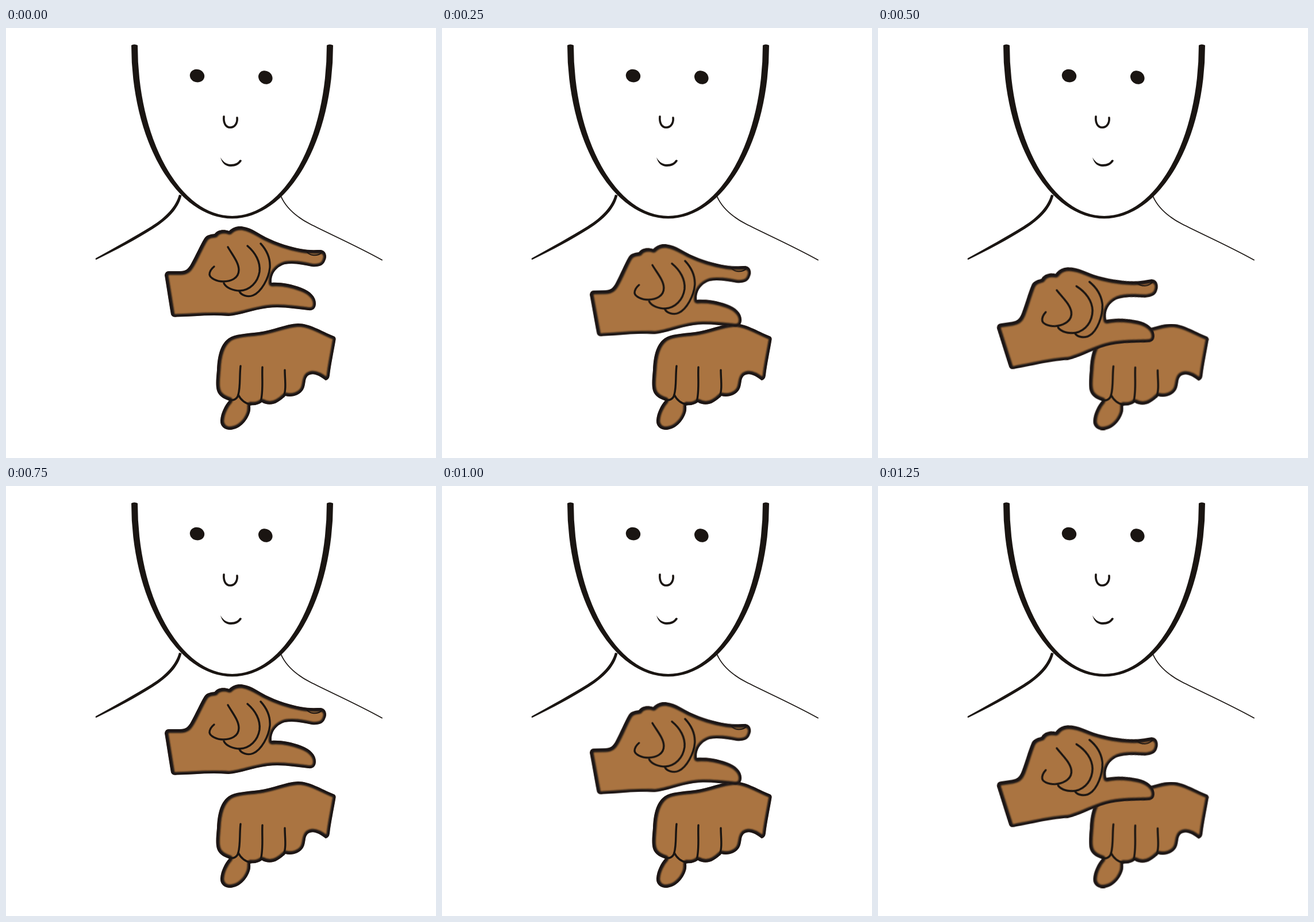
An HTML page for the animation above (1500 ms loop, 748 by 748 pixels).

```html
<!DOCTYPE html>
<html lang="en">
<head>
<meta charset="utf-8">
<title>Signing hands</title>
<style>
  html, body { margin: 0; width: 100%; height: 100%; overflow: hidden; background: #fff; }
  svg { display: block; width: 100%; height: 100%; }
  .ink { fill: #1a1512; }
  .line { fill: none; stroke: #1a1512; stroke-linecap: round; stroke-linejoin: round; }
  .skin { fill: #aa7441; }
  .edge { stroke-width: 11.5; filter: url(#soft); }
  .crease { stroke-width: 3.4; filter: url(#softer); }

  #upper, #lower { transform-origin: 0 0; animation: 750ms step-end infinite; }
  #upper { animation-name: tap; }
  #lower { animation-name: nudge; }

  /* Each pose pins the wrist corner (278, 427), then turns the hand around it. */
  @keyframes tap {
    0% { transform: none; }
    33.333% { transform: translate(259px, 460.8px) rotate(-1.25deg) translate(-278px, -427px); }
    66.667% { transform: translate(208.5px, 519px) rotate(-8.4deg) scale(1.024) translate(-278px, -427px); }
  }
  @keyframes nudge {
    0% { transform: none; }
    66.667% { transform: translate(1.5px, .5px); }
  }
</style>
</head>
<body>
<svg viewBox="0 0 748 748">
  <defs>
    <filter id="soft" filterUnits="userSpaceOnUse" x="200" y="300" width="420" height="440">
      <feGaussianBlur stdDeviation="1"/>
    </filter>
    <filter id="softer" filterUnits="userSpaceOnUse" x="200" y="300" width="420" height="440">
      <feGaussianBlur stdDeviation=".5"/>
    </filter>

    <path id="pinch" d="M276 430 Q277 423 283 423 L303 423 C313 423 317 419 322 410
      C330 396 337 379 345 366 C349 360 355 359 363 358 C367 352 377 349 388 353
      C395 346 404 344 412 345.5 C428 348 440 358 452 364 C472 374 496 381 512 384
      C526 387 538 386 548 386 C557 388 559 397 555 405 C552 413 545 416 532 415
      C517 412 501 408 485 411 C471 415 461 427 462 443 C476 442 496 445 514 452
      C530 458 539 468 539 479 C539 487 535 492 526 491 C506 489 480 484 455 487
      C430 490 406 500 387 501 C355 498 325 502 297 502.500 Q289 504 287 498
      C283 474 279 448 276 430Z"/>
    <path id="fist" d="M570 536 C548 527 528 514 508 514 C486 515 464 526 440 529
      C416 532 399 532 387 540 C372 551 368 572 367 595 C365 617 364 630 371 638
      C376 644 382 646 388 648 C381 656 374 669 373 682 C372 693 380 699 390 699
      C406 698 418 685 423 672 C426 665 425 661 425 656 C433 657 440 655 445 651
      C453 656 464 656 472 651 C479 647 483 643 486 640 C497 643 511 639 517 629
      C522 620 519 611 525 605 C534 598 546 605 556 613 Q562 612 563 604
      C565 586 570 563 573.500 542 Q574 537.500 570 536Z"/>
    <clipPath id="pinchClip"><use href="#pinch"/></clipPath>
    <clipPath id="fistClip"><use href="#fist"/></clipPath>
  </defs>

  <!-- Face and shoulders -->
  <path class="ink" d="M218 30 Q223 27 229 30 A164.500 297 0 0 0 558 30
    Q563 27 569 30 A175.500 301.500 0 0 1 218 30Z"/>
  <ellipse class="ink" cx="332.5" cy="83.2" rx="12.8" ry="11.2" transform="rotate(14 332.5 83.2)"/>
  <ellipse class="ink" cx="451.3" cy="86" rx="12.8" ry="11.2" transform="rotate(35 451.3 86)"/>
  <path class="line" stroke-width="3.6" d="M379 154 C378 165 382 173 390 173 C399 173 403 164 402 156"/>
  <path class="ink" d="M373 225 C379 235 385 237 391 237 C399 237 404 234 406 230
    Q409 228 410 231 C406 238 399 241 391 241 C383 241 376 236 373 225Z"/>
  <path class="ink" d="M301 290 L305.500 291 C300 315 281 333 256 349 C226 368 192 386 157 403
    Q154 402 157 400 C191 381 224 363 253 345 C277 330 295 312 301 290Z"/>
  <path class="line" stroke-width="1.8" d="M478 292 C486 311 504 328 529 341 C562 358 608 378 654 403.500"/>

  <!-- Fist, palm down -->
  <g id="lower">
    <g clip-path="url(#fistClip)">
      <use class="skin" href="#fist"/>
      <use class="line edge" href="#fist" x=".5"/>
    </g>
    <g class="line crease">
      <path d="M408 588 C406 606 408 624 404 638 C402 646 395 649 387 646"/>
      <path d="M404 638 C408 646 415 653 426 655"/>
      <path d="M446 590 C445 610 448 632 443 650"/>
      <path d="M485 595 C485 611 488 628 483 641"/>
    </g>
  </g>

  <!-- Hand with finger and thumb apart -->
  <g id="upper">
    <g clip-path="url(#pinchClip)">
      <use class="skin" href="#pinch"/>
      <use class="line edge" href="#pinch" x=".7" y=".7"/>
    </g>
    <g class="line crease">
      <path d="M386 381 C394 395 405 408 405 421 C405 436 390 441 378 441 C366 441 355 435 354 429 C354 424 357 419 362 415"/>
      <path d="M420 379 C434 391 443 407 441 424 C438 443 424 456 407 457 C395 457 383 452 379 444"/>
      <path d="M443 375 C454 387 460 402 459 417 C457 436 444 459 430 465 C421 469 409 465 406 458"/>
      <path stroke-width="2" d="M523 389 C528 396 541 398 549 391"/>
    </g>
  </g>
</svg>
</body>
</html>
```
